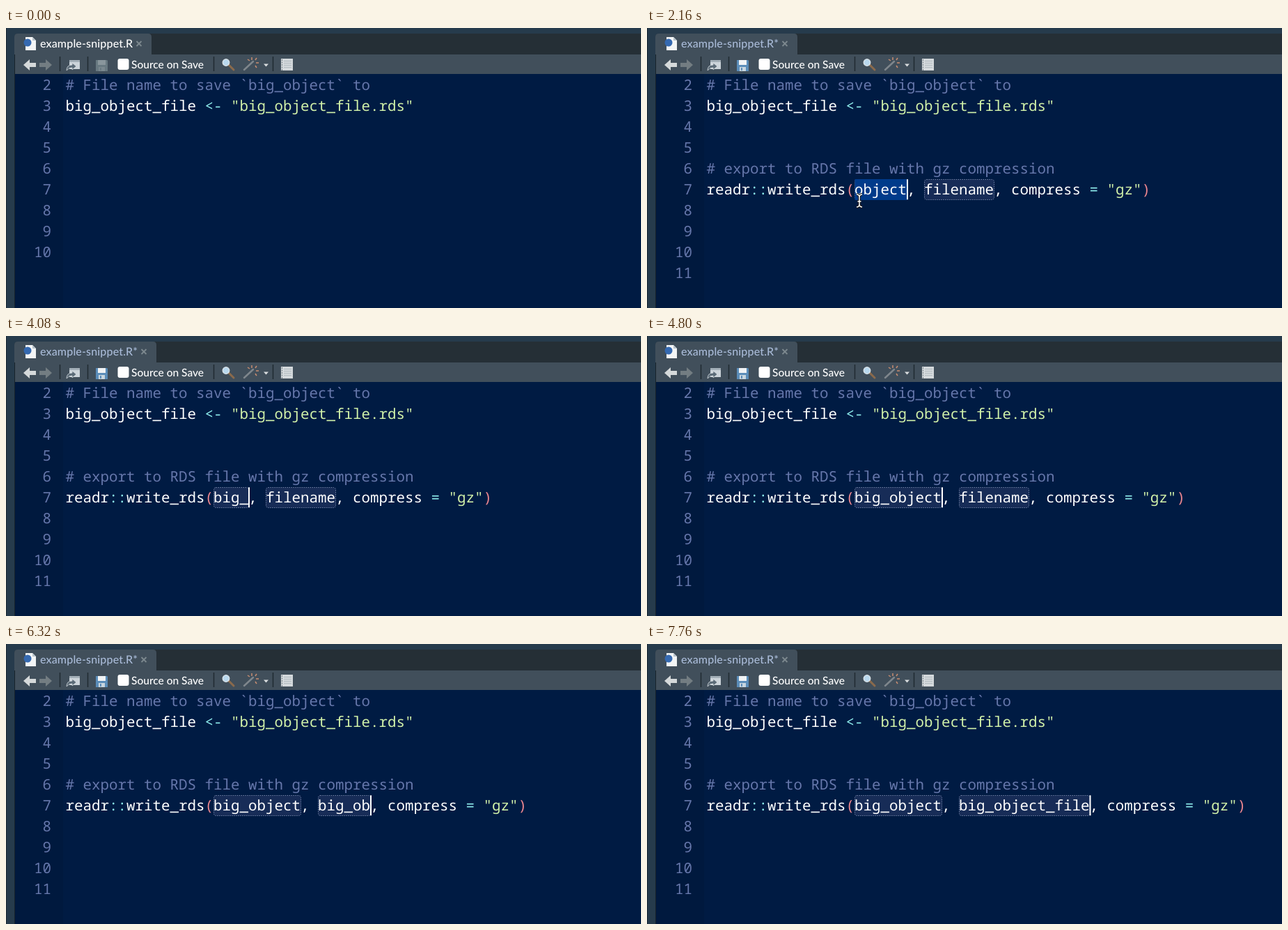
An HTML page that plays this animation: 912x402 px, repeating every 7840 ms.

```html
<!DOCTYPE html>
<html lang="en">
<head>
<meta charset="utf-8">
<title>Code snippet demo</title>
<style>
  html, body { margin: 0; width: 100%; height: 100%; overflow: hidden; background: #263b4c; }
  svg { display: block; }
  text { white-space: pre; text-rendering: geometricPrecision; }
  .code { font: 500 20.83px "Noto Sans Mono", "DejaVu Sans Mono", monospace; }
  .ui { font: 500 15.5px Lato, "Open Sans", sans-serif; }
  .title { font-size: 16px; letter-spacing: .15px; }
</style>
</head>
<body>
<svg width="912" height="402" viewBox="0 0 912 402">
  <path d="M.5 0V402" stroke="#1a2833"/>
  <path d="M12 402V13Q12 8 17 8H912V402Z" fill="#252f36"/>
  <g id="tab"></g>
  <rect x="12" y="38" width="900" height="28" fill="#414f5b"/>
  <rect x="12" y="66" width="900" height="336" fill="#001b43"/>
  <rect x="12" y="66" width="70" height="336" fill="#00193e"/>
  <path d="M12.5 402V38" stroke="#17232b"/>

  <!-- file icon -->
  <path d="M28 13h10l5 5v14H28Z" fill="#f3f5f6"/>
  <path d="M38 13v5h5" fill="#b9c4cc"/>
  <circle cx="31" cy="21" r="5.5" fill="#3569b0"/>

  <!-- toolbar -->
  <path d="M25 53l9-8v5h9v6h-9v5Z" fill="#d5d9da"/>
  <path d="M66 53l-9-8v5h-9v6h9v5Z" fill="#737d82"/>
  <path d="M77.500 41v21M117.500 41v21M298.500 41v21M383.500 41v21" stroke="#202b31" stroke-width="1.500"/>
  <path d="M91 46h15v13H91Z" fill="#ccd4da"/>
  <path d="M91 46h15v3H91Z" fill="#a3afb8"/>
  <path d="M87 61q0-8 8-8v-3l6 5-6 5v-3q-5 0-8 4" fill="#5b6b78" stroke="#e0e5e8" stroke-width=".7"/>
  <g id="disk"></g>
  <rect x="160.500" y="44" width="16" height="16" rx="3" fill="#fff"/>
  <text class="ui" x="180" y="57.500" fill="#fff">Source on Save</text>
  <path d="M320 53l7 7" stroke="#8a6a4c" stroke-width="3" stroke-linecap="round"/>
  <circle cx="316" cy="49.500" r="4.800" fill="#b9d8ee" stroke="#dce3e7" stroke-width="1.300"/>
  <path d="M342 60l13-12" stroke="#7f868c" stroke-width="2.500" stroke-linecap="round"/>
  <path d="M353 42v4M360 43l-2 3M359 50h4M347 45l3 2M358 54l2 3" stroke="#c98d70" stroke-width="1.500"/>
  <path d="M370 51.500h7l-3.500 4Z" fill="#d9dddf"/>
  <path d="M395 44h17v17H395Z" fill="#d4d9dc"/>
  <path d="M399 47.500h11M399 50.500h11M399 53.500h11M399 56.500h11" stroke="#b3bcc1"/>
  <path d="M396.500 45v16" stroke="#6f7a80" stroke-dasharray="2 1.500"/>

  <g id="code" class="code"></g>
</svg>
<script>
const LOOP = 7840, STEP = 80, LEFT = 85.5, CHAR = 12.5;
const WHITE = '#fff', COMMENT = '#6677ab', STRING = '#d1f1a9', OP = '#8eeeee', PAREN = '#ee8790';
const POPUP = 1040, INSERT = 1840, TAB = 5040;

// Moments at which each character is typed
const nameKeys = [240, 320, 400, 560, 640, 800];
const objectKeys = [3120, 3360, 3600, 3840, 4160, 4240, 4400, 4480, 4640, 4720];
const fileKeys = [5440, 5680, 5840, 6000, 6160, 6320, 6400, 6560, 6640, 6800, 6880, 6960, 7040, 7200, 7360];
const allKeys = [...nameKeys, INSERT, ...objectKeys, TAB, ...fileKeys];

const el = id => document.getElementById(id);
const typed = (word, keys, t) => word.slice(0, keys.filter(k => k <= t).length);
const baseline = row => 89 + (row - 2) * 29.95;
const col = n => LEFT + n * CHAR;
const label = (x, y, s, fill, extra = '') => `<text x="${x}" y="${y}" fill="${fill}" ${extra}>${s}</text>`;
const line = (row, ...parts) => `<text x="${LEFT}" y="${baseline(row)}">` +
  parts.map(([s, fill]) => `<tspan fill="${fill}">${s}</tspan>`).join('') + '</text>';

function field(start, length, selected) {
  const x = col(start) + .5, w = length * CHAR;
  return `<rect x="${x}" y="217.5" width="${w}" height="29" rx="3" fill="#172c57" stroke="#7382a6" stroke-dasharray="1.5 1.5"/>` +
    (selected ? `<rect x="${x}" y="217" width="${w}" height="30" fill="#003b8b"/>` : '');
}

function caret(row, n, t) {
  const last = allKeys.filter(k => k <= t).pop() ?? -500;
  return (t - last) % 1000 < 500
    ? `<rect x="${col(n)}" y="${baseline(row) - 21.5}" width="2" height="29" fill="#fff"/>` : '';
}

function popup() {
  const rows = [['writec', 'snippet'], ['write.csv', 'utils'], ['write.csv2', 'utils'], ['writeChar', 'base']];
  return '<rect x="75.500" y="222.500" width="288" height="145" fill="#293136" stroke="#4b565b"/>' +
    '<rect x="79" y="225" width="282" height="34" fill="#454d51"/>' +
    rows.map(([name, pkg], i) => {
      const y = 249 + i * 35.3;
      const icon = i
        ? `<path d="M86 ${y - 8}l7-7 7 3-7 8Z" fill="#69bfdc"/>`
        : '<path d="M87 233h8l3 3v10H87Z" fill="#eceff0"/><path d="M89 238h7M89 240.500h7M89 243h7" stroke="#899398"/>';
      return icon + label(107, y, name, WHITE) + label(346, y, `{${pkg}}`, '#858b8e', 'text-anchor="end"');
    }).join('') +
    '<path d="M299.500 254v18l4-4 3.500 8 3.500-1.500-3.500-7.500h6Z" fill="#080808" stroke="#eee" stroke-width="1.300"/>';
}

function snippet(t) {
  const object = typed('big_object', objectKeys, t) || 'object';
  const file = typed('big_object_file', fileKeys, t) || 'filename';
  const objectPicked = t < objectKeys[0], filePicked = t >= TAB && t < fileKeys[0];
  const fileCol = 17 + object.length + 2;
  const beam = 'M301 239q4 0 4 4v10q0 4-4 4M309 239q-4 0-4 4v10q0 4 4 4M302.500 249h5';
  return field(17, object.length, objectPicked) + field(fileCol, file.length, filePicked) +
    line(6, ['# export to RDS file with gz compression', COMMENT]) +
    line(7, ['readr', WHITE], ['::', OP], ['write_rds', WHITE], ['(', PAREN],
      [`${object}, ${file}, compress `, WHITE], ['= ', OP], ['"gz"', STRING], [')', PAREN]) +
    caret(7, t < TAB ? 17 + object.length : fileCol + file.length, t) +
    (objectPicked
      ? `<path d="${beam}" fill="none" stroke="#111" stroke-width="3.500"/><path d="${beam}" fill="none" stroke="#fff" stroke-width="1.500"/>`
      : '');
}

function drawTab(dirty) {
  const right = dirty ? 216 : 209, x = right - 17.5;
  el('tab').innerHTML =
    `<path d="M12 38V13Q12 8 17 8H${right - 5}Q${right} 8 ${right} 13V38Z" fill="#414f5b"/>` +
    label(49, 27.5, 'example-snippet.R' + (dirty ? '*' : ''), dirty ? '#a9bbd8' : '#fff', 'class="ui title"') +
    `<path d="M${x - 4} 19l7 7m0-7l-7 7" stroke="#7d898f" stroke-width="1.800"/>`;
  const [body, sheet, metal] = dirty ? ['#5b8db9', '#f0f3f5', '#c8d6df'] : ['#687981', '#89969c', '#7a888f'];
  el('disk').innerHTML = `<path d="M129 46h16l1 1v15h-17Z" fill="${body}"/>` +
    `<path d="M132 46h11v7h-11Z" fill="${sheet}"/><path d="M133 56h9v6h-9Z" fill="${metal}"/><path d="M135 57h2v4h-2Z" fill="${body}"/>`;
}

function draw(t) {
  const inserted = t >= INSERT;
  let out = '';
  for (let row = 2; row <= (inserted ? 11 : 10); row++)
    out += label(65, baseline(row), row, COMMENT, 'text-anchor="end"');
  out += line(2, ['# File name to save `big_object` to', COMMENT]) +
    line(3, ['big_object_file ', WHITE], ['&lt;- ', OP], ['"big_object_file.rds"', STRING]);
  if (inserted) out += snippet(t);
  else {
    const word = typed('writec', nameKeys, t);
    out += line(6, [word, WHITE]) + caret(6, word.length, t);
    if (t >= POPUP) out += popup();
  }
  el('code').innerHTML = out;
  drawTab(t >= nameKeys[0]);
}

let shown = -1;
const start = performance.now();
function frame() {
  const t = Math.floor((performance.now() - start) % LOOP / STEP) * STEP;
  if (t !== shown) draw(shown = t);
  requestAnimationFrame(frame);
}
frame();
</script>
</body>
</html>
```
